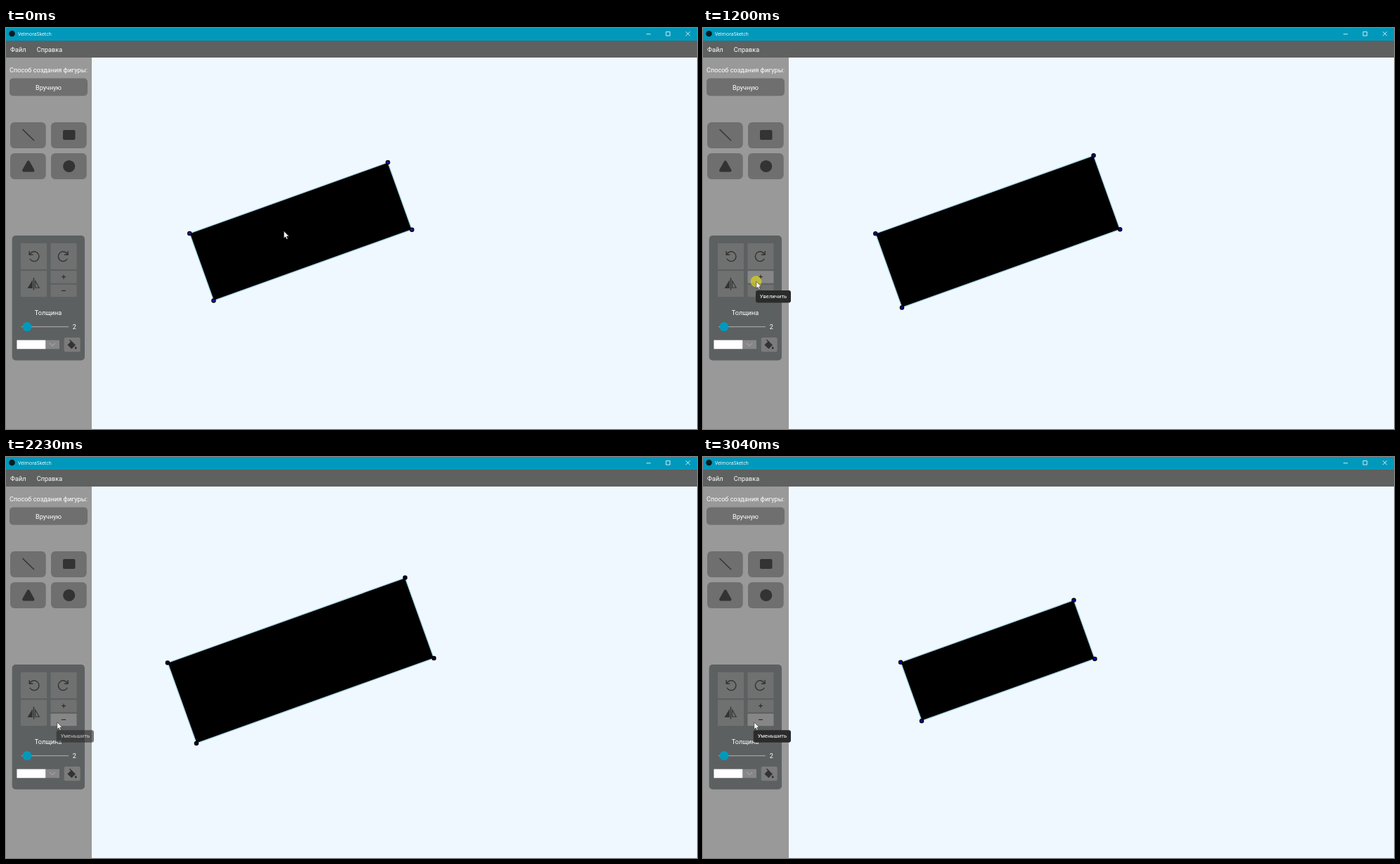
These frames come from a looping animation (983 by 570 pixels, 3.74 s). An HTML page:

```html
<!DOCTYPE html>
<html lang="ru">
<head>
<meta charset="utf-8">
<title>Графический редактор</title>
<style>
  html, body { margin: 0; width: 100%; height: 100%; overflow: hidden; background: #f0f8ff; }
  svg { display: block; width: 983px; height: 570px; }
  text { font: 9.15px Roboto, sans-serif; fill: #fff; }
  .mid { text-anchor: middle; }
  .title { font: 6.9px "Open Sans", sans-serif; }
  .tip text { font-size: 7.7px; }
  .tip rect { fill: #2b2b2b; }
  .tool { fill: #6f6f6f; }
  .key { fill: #6f7070; }
  .key.hover { fill: #868686; }
  .ink { fill: #333; }
  .line { fill: none; stroke: #333; stroke-width: 1.4; }
  .sys { fill: none; stroke: #fff; stroke-width: .8; }
  .dot { stroke: #000; stroke-width: 1.3; }
</style>
</head>
<body>
<svg viewBox="0 0 983 570">
  <rect width="983" height="570" fill="#f0f8ff"/>
  <rect y="41" width="122" height="529" fill="#999"/>
  <rect y="17" width="983" height="25" fill="#5f6060"/>
  <rect width="983" height="18" fill="#0099bc"/>

  <circle cx="8.5" cy="8" r="4.3" fill="#0b1a20"/>
  <text class="title" x="17" y="11.2">VelmoraSketch</text>
  <path class="sys" d="M911 8.7h6.2M939 5.4h5.6v5.6h-5.6zM967 5.2l6 6m0-6l-6 6"/>
  <text x="6" y="34">Файл</text>
  <text x="43.7" y="34">Справка</text>

  <text class="mid" x="60.5" y="63">Способ создания фигуры:</text>
  <rect class="tool" x="5" y="71.5" width="111" height="25" rx="5"/>
  <text class="mid" x="60.5" y="87.5">Вручную</text>

  <g class="tool">
    <rect x="6" y="134" width="50.7" height="37" rx="6"/>
    <rect x="64" y="134" width="50.7" height="37" rx="6"/>
    <rect x="6" y="178" width="50.7" height="37" rx="6"/>
    <rect x="64" y="178" width="50.7" height="37" rx="6"/>
  </g>
  <path class="line" d="M23.5 144l16.5 16"/>
  <rect class="ink" x="81" y="145" width="17.5" height="14" rx="2"/>
  <path class="ink" d="M31.8 190.5l6.7 12h-13.4z" stroke="#333" stroke-width="4" stroke-linejoin="round"/>
  <circle class="ink" cx="89.7" cy="196.5" r="8.6"/>

  <rect x="8.7" y="295" width="103.3" height="177.5" rx="5" fill="#5d6060"/>
  <rect class="key" x="21" y="306" width="37" height="37"/>
  <rect class="key" x="63.5" y="306" width="37" height="37"/>
  <rect class="key" x="21" y="345.2" width="37" height="37"/>
  <rect class="key" id="plus" x="63.5" y="345.2" width="37" height="17.5"/>
  <rect class="key" id="minus" x="63.5" y="364.8" width="37" height="17.4"/>
  <path class="line" id="turn" d="M33.2 317v5.2h5.2M33.8 321.8a6.9 6.9 0 1 1 .2 6.2"/>
  <use href="#turn" transform="matrix(-1 0 0 1 121.3 0)"/>
  <path class="line" d="M39.5 355v17.5" stroke-width="1.1"/>
  <path class="ink" d="M37.8 358v12h-7.3z"/>
  <path class="line" d="M41.7 359.5v9.8h5.5z" style="stroke-width:1.1"/>
  <path class="line" d="M79 353.7h6m-3-3v6M79 373.4h6" style="stroke:#222;stroke-width:1"/>

  <text class="mid" x="60" y="407.5">Толщина</text>
  <path d="M22 424.6h67" stroke="#a0a0a0" stroke-width="1.3"/>
  <circle cx="30" cy="424.6" r="6.5" fill="#0099bc"/>
  <text class="mid" x="97.4" y="428">2</text>
  <rect x="15.5" y="443.7" width="60.5" height="12.5" fill="#868686"/>
  <rect x="15.5" y="443.7" width="40.7" height="12.5" fill="#fff"/>
  <path d="M62.2 448l3.9 4 3.9-4" fill="none" stroke="#b5b5b5" stroke-width=".9"/>
  <rect class="tool" x="82.7" y="440" width="23" height="20.3" rx="2" style="fill:#7b7b7b"/>
  <path class="ink" d="M93 445l6 5.5-5.6 5.7-6-5.7z"/>
  <path class="line" d="M90.5 443.3l4 4"/>
  <path class="ink" d="M99.2 452.5q3 3.5 0 4-3-.5 0-4z"/>

  <g id="shape"><path fill="#000" stroke="#add8e6" stroke-width="1.3"/></g>

  <g class="tip" id="tipPlus">
    <rect x="75" y="373" width="50" height="17.5" rx="3"/>
    <text class="mid" x="100" y="384">Увеличить</text>
  </g>
  <g class="tip" id="tipMinus">
    <rect x="71.7" y="388.3" width="53.3" height="17.5" rx="3"/>
    <text class="mid" x="98.4" y="399.4">Уменьшить</text>
  </g>

  <g id="cursor">
    <circle id="press" cx="-.3" r="8" fill="#d8d31c" fill-opacity=".7"/>
    <path d="M0 0v10l2.3-2 1.6 3.5 1.6-.7-1.5-3.4h3.2z" fill="#fff" stroke="#222" stroke-width=".6"/>
  </g>
</svg>
<script>
  const LOOP = 3740;
  const CENTER = [419.3, 289.3], HALF = [149.8, 50.8], TILT = -19.7 * Math.PI / 180;
  const HOME = [395.3, 288.7], PLUS = [75.8, 360.3];

  // Stepped tracks: [start in ms, value]
  const zooms = [[0, 0, 0], [1130, 1, 0], [1340, 2, 0], [1540, 3, 0],
                 [2230, 3, 1], [2490, 3, 2], [2700, 3, 3], [3040, 3, 4]];
  const dotInk = [[0, '#1515b8'], [1130, '#0000b4'], [1540, '#00006c'], [2230, '#000036'], [2700, '#0000b0']];
  const tipPlus = [[0, 0], [930, .3], [1000, .7], [1070, 1], [1680, .5], [1750, 0]];
  const tipMinus = [[0, 0], [2160, .3], [2230, .62], [2300, .9], [2360, 1]];
  const hover = [[0, ''], [600, 'plus'], [1750, 'minus']];
  const settle = [[0, PLUS], [1680, [74, 366]], [1750, [71.5, 372]], [1820, [70, 375.5]],
                  [1890, [71, 376.3]], [1960, [72.8, 377]]];
  const presses = [[1070, 1130], [1200, 1340], [1470, 1540], [2160, 2230],
                   [2420, 2490], [2630, 2700], [2900, 3040]];

  const $ = id => document.getElementById(id);
  const at = (track, t) => track.filter(k => k[0] <= t).pop();
  const corners = [[1, -1], [1, 1], [-1, 1], [-1, -1]];
  const outline = $('shape').firstElementChild;
  const dots = corners.map(() => {
    const dot = document.createElementNS('http://www.w3.org/2000/svg', 'circle');
    dot.setAttribute('class', 'dot');
    dot.setAttribute('r', 2.6);
    return $('shape').appendChild(dot);
  });

  function drawShape(scale, ink) {
    const c = Math.cos(TILT) * scale, s = Math.sin(TILT) * scale;
    const points = corners.map(([u, v]) => {
      const x = u * HALF[0], y = v * HALF[1];
      return [CENTER[0] + x * c - y * s, CENTER[1] + x * s + y * c];
    });
    outline.setAttribute('d', 'M' + points.join('L') + 'Z');
    dots.forEach((dot, i) => {
      dot.setAttribute('cx', points[i][0]);
      dot.setAttribute('cy', points[i][1]);
      dot.setAttribute('fill', ink);
    });
  }

  function cursorAt(t) {
    if (t < 260) return HOME;
    if (t >= 660) return at(settle, t)[1];
    const p = (Math.floor((t - 260) / 66.6) + 1) / 7;
    const e = p * p * (3 - 2 * p);
    return HOME.map((a, i) => a + (PLUS[i] - a) * e);
  }

  function render(t) {
    const [, ups, downs] = at(zooms, t);
    drawShape(1.1 ** ups * .9 ** downs, at(dotInk, t)[1]);
    $('tipPlus').setAttribute('opacity', at(tipPlus, t)[1]);
    $('tipMinus').setAttribute('opacity', at(tipMinus, t)[1]);
    for (const id of ['plus', 'minus']) $(id).classList.toggle('hover', at(hover, t)[1] === id);
    $('cursor').setAttribute('transform', `translate(${cursorAt(t)})`);
    $('press').setAttribute('opacity', presses.some(([a, b]) => t >= a && t < b) ? 1 : 0);
  }

  const start = performance.now();
  function tick() {
    render((performance.now() - start) % LOOP);
    requestAnimationFrame(tick);
  }
  tick();
</script>
</body>
</html>
```
